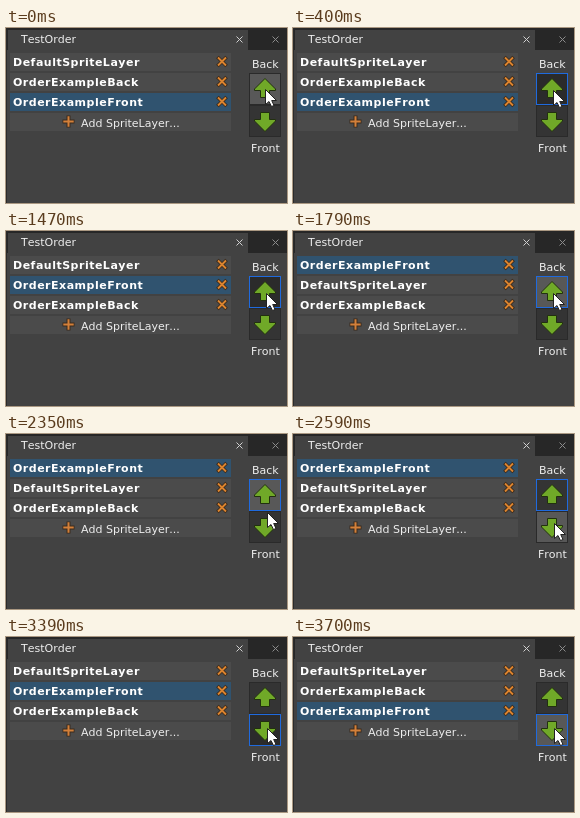
Recreate the animation shown at these times as an HTML page with a canvas. Size 281x175 px, loop 4020 ms.

```html
<!DOCTYPE html>
<html lang="en">
<head>
<meta charset="utf-8">
<title>Layer order</title>
<style>
html, body { margin: 0; width: 100%; height: 100%; overflow: hidden; background: #424242; }
canvas { display: block; }
</style>
</head>
<body>
<canvas id="stage" width="281" height="175"></canvas>
<script>
const ctx = document.getElementById('stage').getContext('2d');
const LOOP = 4020;
const FONT = '11px "DejaVu Sans", sans-serif';
const BOLD = 'bold 11px "DejaVu Sans", sans-serif';
const BASE = 'DefaultSpriteLayer', BACK = 'OrderExampleBack', FRONT = 'OrderExampleFront';

// Each list holds [start time, value...] in order.
const orders = [
  [0, BASE, BACK, FRONT],
  [710, BASE, FRONT, BACK],
  [1790, FRONT, BASE, BACK],
  [3070, BASE, FRONT, BACK],
  [3700, BASE, BACK, FRONT]
];
const upStates = [
  [0, 'hover'], [400, 'pressed'], [710, 'hover'], [1470, 'pressed'],
  [1790, 'hover'], [2430, 'normal']
];
const downStates = [
  [0, 'normal'], [2430, 'hover'], [2990, 'pressed'], [3070, 'hover'],
  [3390, 'pressed'], [3700, 'hover']
];
const focusStates = [[0, 'none'], [400, 'up'], [2990, 'down']];
const cursorPath = [
  [0, 259, 61], [80, 260, 62], [2110, 260, 64], [2190, 261, 68],
  [2270, 261, 73], [2350, 261, 78], [2430, 261, 82], [2510, 261, 86],
  [2590, 261, 89], [2670, 261, 91]
];
const fills = { normal: '#343434', hover: '#585858', pressed: '#2b2b2b' };

function at(track, t) {
  let found = track[0];
  for (const key of track) if (key[0] <= t) found = key;
  return found.slice(1);
}

function rect(x, y, w, h, color) {
  ctx.fillStyle = color;
  ctx.fillRect(x, y, w, h);
}

function text(str, x, y, font, color, spacing = 0) {
  ctx.font = font;
  ctx.fontKerning = 'none';
  ctx.letterSpacing = spacing + 'px';
  ctx.fillStyle = color;
  ctx.fillText(str, x, y);
}

function shape(points, fill, stroke) {
  ctx.beginPath();
  points.forEach(([x, y]) => ctx.lineTo(x, y));
  ctx.closePath();
  ctx.fillStyle = fill;
  ctx.fill();
  ctx.strokeStyle = stroke;
  ctx.lineWidth = 1;
  ctx.stroke();
}

function lines(pairs, color, width) {
  ctx.beginPath();
  for (const [x1, y1, x2, y2] of pairs) {
    ctx.moveTo(x1, y1);
    ctx.lineTo(x2, y2);
  }
  ctx.strokeStyle = color;
  ctx.lineWidth = width;
  ctx.stroke();
}

function cross(x, y, r, color, width) {
  lines([[x - r, y - r, x + r, y + r], [x + r, y - r, x - r, y + r]], color, width);
}

function plus(x, y, r, color, width) {
  lines([[x - r, y, x + r, y], [x, y - r, x, y + r]], color, width);
}

function tabs() {
  rect(0, 0, 281, 22, '#272727');
  rect(2, 2, 240, 20, '#424242');
  rect(0, 0, 1, 175, '#2b2b2b');
  text('TestOrder', 15, 15, FONT, '#eeeeee');
  cross(233.5, 11.5, 3, '#d0d0d0', 1);
  cross(269.5, 11.5, 3, '#8c8c8c', 1);
}

function rows(names) {
  names.forEach((name, i) => {
    const y = 25 + i * 20;
    rect(4, y, 221, 18, name === FRONT ? '#30536f' : '#4b4b4b');
    text(name, 7, y + 13, BOLD, '#ffffff', 0.5);
    cross(216, y + 8.5, 4.6, '#3a2a1c', 3.6);
    cross(216, y + 8.5, 4, '#dc842f', 1.8);
  });
  rect(4, 85, 221, 18, '#4b4b4b');
  plus(62.5, 93.5, 6, '#3a2a1c', 4);
  plus(62.5, 93.5, 5.2, '#d3803a', 2);
  text('Add SpriteLayer...', 75, 99, FONT, '#eeeeee');
}

function button(y, state, focused, dir) {
  rect(243, y, 32, 32, focused ? '#1f6ade' : '#2a2a2a');
  rect(244, y + 1, 30, 30, fills[state]);
  const c = y + 16 - dir / 2;
  const half = [[0, -10], [10.5, 0.5], [10.5, 2], [4.5, 2], [4.5, 9]];
  const mirrored = half.slice(1).reverse().map(([x, d]) => [-x, d]);
  const arrow = [...half, ...mirrored];
  shape(arrow.map(([x, d]) => [259 + x, c + d * dir]), '#70a928', '#22300f');
}

function cursor(x, y) {
  const outline = [[0, 0], [0, 15], [3.5, 12], [6, 17], [8.5, 16], [6.2, 11], [11, 11]];
  shape(outline.map(([dx, dy]) => [x + 0.5 + dx, y + 0.5 + dy]), '#ffffff', '#222222');
}

function draw(t) {
  const [focus] = at(focusStates, t);
  rect(0, 0, 281, 175, '#424242');
  tabs();
  rows(at(orders, t));
  text('Back', 246, 40, FONT, '#eeeeee');
  text('Front', 245, 124, FONT, '#eeeeee');
  button(45, at(upStates, t)[0], focus === 'up', 1);
  button(77, at(downStates, t)[0], focus === 'down', -1);
  cursor(...at(cursorPath, t));
}

const start = performance.now();
function tick() {
  draw((performance.now() - start) % LOOP);
  requestAnimationFrame(tick);
}
draw(0);
requestAnimationFrame(tick);
</script>
</body>
</html>
```
